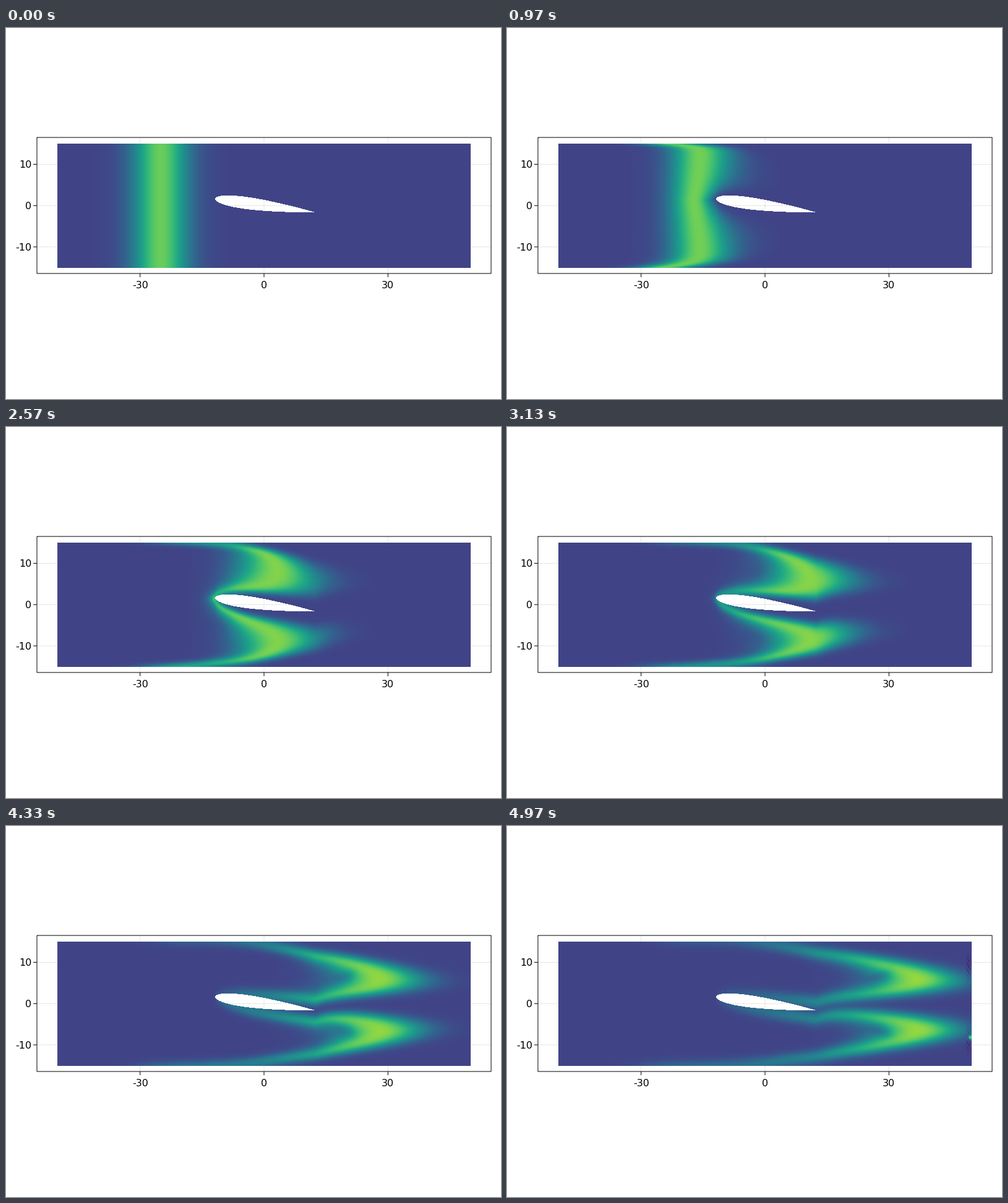
A matplotlib script for the animation above (5010 ms loop, 800 px wide and 600 px high).

```python
import numpy as np
import matplotlib.pyplot as plt
from matplotlib.animation import FuncAnimation

W, H, DPI = 800, 600, 100
FRAMES, LOOP = 150, 5010
SCALE, CX, CY = 6.677, 417, 287.2        # pixels per unit, pixel of the origin
L, R, TOP, BOT = 83, 751, 187, 388       # field rectangle in pixels
LE, TE = (-11.8, 1.65), (12.45, -1.65)   # leading and trailing edge
LINES = 90                               # streamlines on each side of the wing
SIGMA, START = 4.8, -25

x = (np.arange(L, R) + 0.5 - CX) / SCALE
y = (CY - np.arange(TOP, BOT) - 0.5) / SCALE
X, Y = np.meshgrid(x, y)


def logistic(mid, width):
    """Falls from 1 to 0 along x."""
    return 1 / (1 + np.exp((x - mid) / width))


def surface(sign):
    """Height of one side of a rotated NACA 0012 section."""
    k = (1 - np.cos(np.linspace(0, np.pi, 300))) / 2
    half = 0.6 * (0.2969 * np.sqrt(k) - 0.126 * k - 0.3516 * k**2
                  + 0.2843 * k**3 - 0.1036 * k**4)
    dx, dy = TE[0] - LE[0], TE[1] - LE[1]
    px = LE[0] + k * dx - sign * half * dy
    py = LE[1] + k * dy + sign * half * dx
    return np.interp(x, np.maximum.accumulate(px), py)


ahead, behind = x < LE[0], x > TE[0]
dist = np.maximum(LE[0] - x, 0)          # distance upstream of the nose
past = np.maximum(x - TE[0], 0)          # distance downstream of the tail
on_wing = ~(ahead | behind)


def inner_edge(sign):
    """Dividing streamline, wing surface, then wake line."""
    front = LE[1] - 1.2 * (1 - np.exp(-dist / 6))
    wake = TE[1] * np.exp(-past / 4)
    return np.where(ahead, front, np.where(behind, wake, surface(sign)))


def passage(sign, wall_power, core):
    """Travel times along streamlines and each pixel's streamline number."""
    edge = inner_edge(sign)
    depth = 15 - sign * edge
    n = 2.2 + wall_power * logistic(-9 if sign > 0 else -6, 4)
    m = core * (4.5 + 4 * logistic(4, 4))
    near = np.exp(-dist / 2)
    m = np.where(ahead, 2 + (m - 2) * near, m)
    a = np.where(ahead, 1 - np.exp(-dist / 5), 0.35 * (1 - np.exp(-past / 8)))

    s = (1 - np.cos(np.linspace(0, np.pi, 240))) / 2
    c = s[:, None]
    f = (1 - c**n) * (1 - (1 - a) * (1 - c)**m)
    flux = np.zeros_like(f)
    flux[1:] = np.cumsum((f[1:] + f[:-1]) / 2 * np.diff(s)[:, None], axis=0)
    flux /= flux[-1]
    speed = (9.2 + 5.3 * (1 - logistic(-9, 4.5))) * f / f.max(axis=0)

    psi = np.sin(np.linspace(0, np.pi / 2, LINES))**2
    depth_s = np.clip(sign * (Y - edge) / depth, 0, 1)
    u = np.empty((LINES, x.size))
    number = np.empty_like(X)
    for i in range(x.size):
        u[:, i] = np.interp(psi, flux[:, i], speed[:, i])
        q = np.interp(depth_s[:, i], s, flux[:, i])
        number[:, i] = np.arcsin(np.sqrt(np.clip(q, 0, 1)))
    number *= (LINES - 1) / (np.pi / 2)
    travel = np.cumsum((x[1] - x[0]) / np.maximum(u, 0.03), axis=1)
    return travel, number


up_time, up_num = passage(1, 28, 1.0)
low_time, low_num = passage(-1, 14, 0.68)
travel = np.vstack([up_time, low_time])
upper = Y > (inner_edge(1) + inner_edge(-1)) / 2
num = np.where(upper, up_num, low_num)
lo = np.clip(num.astype(int), 0, LINES - 2)
frac = num - lo
lo = lo + np.where(upper, 0, LINES)
cols = np.broadcast_to(np.arange(x.size), X.shape)

wing = on_wing & (Y < surface(1)) & (Y > surface(-1))
fluid = (~wing).astype(float)

# Dim pools that follow the two crests
KEYS = [1.2, 1.97, 3.13, 3.67, 4.33, 4.97]
POOL_X = [-22, -18, -1, 9, 20.3, 28.8]
POOL_Y = [1.5, 1.5, 7.8, 6.8, 6.6, 6.7]
POOL_H = [3.5, 3.5, 2.2, 1.8, 1.5, 1.4]
POOL_A = [0, 0.03, 0.045, 0.055, 0.11, 0.12]


def pools(t):
    px, py, ph, pa = (np.interp(t, KEYS, k) for k in (POOL_X, POOL_Y, POOL_H, POOL_A))
    if pa == 0:
        return 0
    dx = X - px
    tilt = 0.25 * np.clip((t - 2) / 1.2, 0, 1)
    dy = np.abs(Y) - py - tilt * dx
    span = np.where(dx < 0, 3.4, 2.3)
    return pa * np.exp(-(dx / span)**2 - (dy / ph)**2)


def outlet(t):
    """Ripples where the crest reaches the right-hand boundary."""
    k = np.clip((t - 4.65) / 0.32, 0, 1)**2
    if k == 0:
        return 0
    strip = np.exp(-((X - 49.2) / 0.45)**2)
    rough = np.exp(-((np.abs(Y) - 8.5) / 3.2)**2)
    dot = np.exp(-((X - 49.75)**2 + (Y + 8.2)**2) / 0.3)
    ripple = -0.1 + 0.1 * np.sin(4.3 * Y + 9 * X)
    return k * (strip * rough * ripple + 0.7 * dot)


def field(t):
    origin = np.array([np.interp(row - t, row, x) for row in travel])
    pos = origin[lo, cols] * (1 - frac) + origin[lo + 1, cols] * frac
    c = np.exp(-(pos - START)**2 / (2 * SIGMA**2)) * fluid
    spread = max(0.2 * t, 0.02)
    k = np.exp(-((y[:, None] - y) / spread)**2 / 2)
    c = (k @ c) / np.maximum(k @ fluid, 1e-9)
    v = 0.205 + (0.565 + 0.016 * t) * c - pools(t) + outlet(t)
    return np.ma.array(np.clip(v, 0, 1), mask=wing)


fig = plt.figure(figsize=(W / DPI, H / DPI), dpi=DPI, facecolor="white")
ax = fig.add_axes([0, 0, 1, 1])
ax.set_axis_off()
ax.set_xlim(0, W)
ax.set_ylim(H, 0)

BOX = (50, 784, 177, 397)
PX = 72 / DPI


def line(xs, ys, **kw):
    ax.plot(xs, ys, color="black", lw=PX, snap=False, solid_capstyle="butt", **kw)


def label(px, py, value, ha):
    ax.text(px, py, str(value), ha=ha, va="baseline", family="DejaVu Sans",
            size=16 * PX, color="black")


for v in (-30, 0, 30):
    px = CX + v * SCALE
    line([px, px], BOX[2:], alpha=0.1, zorder=1)
    line([px, px], [BOX[3], BOX[3] + 6], zorder=4)
    label(px, 421, v, "center")
for v in (10, 0, -10):
    py = CY - v * SCALE
    line(BOX[:2], [py, py], alpha=0.1, zorder=1)
    line([BOX[0] - 6, BOX[0]], [py, py], zorder=4)
    label(41.5, py + 5.8, v, "right")
line([BOX[0], BOX[1], BOX[1], BOX[0], BOX[0]],
     [BOX[2], BOX[2], BOX[3], BOX[3], BOX[2]], zorder=4)

image = ax.imshow(field(0), cmap="viridis", vmin=0, vmax=1, aspect="auto",
                  extent=(L, R, BOT, TOP), interpolation="nearest", zorder=2)
ax.set_xlim(0, W)
ax.set_ylim(H, 0)


def update(i):
    image.set_data(field(i / 30))
    return (image,)


anim = FuncAnimation(fig, update, frames=FRAMES, interval=LOOP / FRAMES,
                     repeat=True, repeat_delay=0)
plt.show()
```
